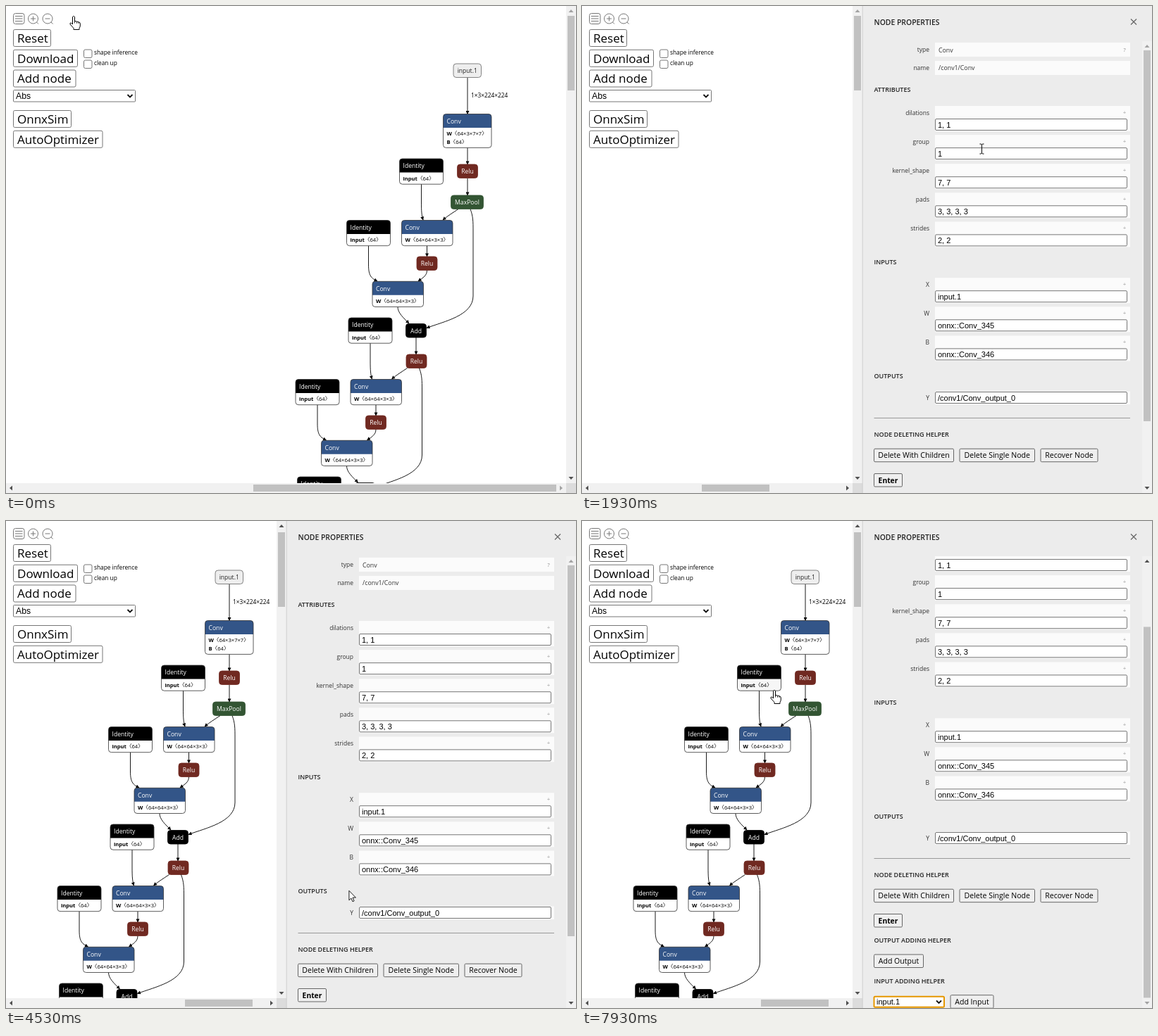
An HTML page for the animation above (8 s loop, 809 by 692 pixels).

```html
<!DOCTYPE html>
<html lang="en">
<head>
<meta charset="utf-8">
<title>Model editor</title>
<style>
html, body { margin: 0; width: 100%; height: 100%; overflow: hidden; background: #fff; }
svg { display: block; width: 100%; height: 100%; font-family: "Open Sans", "Noto Sans CJK SC", "Noto Sans CJK JP", sans-serif; }
.arial { font-family: "Liberation Sans", Arial, sans-serif; }
.edge { fill: none; stroke: #000; stroke-width: .9; marker-end: url(#tip); }
</style>
</head>
<body>
<svg id="stage" viewBox="0 0 809 692">
  <defs>
    <marker id="tip" viewBox="0 0 10 10" refX="9" refY="5" markerWidth="6" markerHeight="5" markerUnits="userSpaceOnUse" orient="auto"><path d="M0 0 10 5 0 10Z"/></marker>
  </defs>
  <g id="scene"></g>
</svg>
<script>
const LOOP = 8000, TICK = 1000 / 15;
const BLUE = '#335588', RED = '#702921', GREEN = '#335533', BLACK = '#000';

const rect = (x, y, w, h, fill, stroke = 'none', r = 0, sw = 1) =>
  `<rect x="${x}" y="${y}" width="${w}" height="${h}" rx="${r}" fill="${fill}" stroke="${stroke}" stroke-width="${sw}"/>`;
const text = (x, y, s, size, attrs = '') => `<text x="${x}" y="${y}" font-size="${size}" ${attrs}>${s}</text>`;
const line = (d, stroke, sw = 1) => `<path d="${d}" fill="none" stroke="${stroke}" stroke-width="${sw}"/>`;
const edge = d => `<path class="edge" d="${d}"/>`;
const clip = (id, x, y, w, h, body) =>
  `<clipPath id="${id}"><rect x="${x}" y="${y}" width="${w}" height="${h}"/></clipPath><g clip-path="url(#${id})">${body}</g>`;

// Piecewise linear tracks: [time, value, value, ...]
function at(keys, t) {
  let i = keys.findIndex(k => k[0] > t);
  if (i < 0) return keys[keys.length - 1].slice(1);
  if (i === 0) return keys[0].slice(1);
  const a = keys[i - 1], b = keys[i], u = (t - a[0]) / (b[0] - a[0]);
  return a.slice(1).map((v, n) => typeof v === 'number' ? v + (b[n + 1] - v) * u : v);
}

const PAN = [[3066, 0, 0], [3600, 98, 12], [3667, 98, 12], [3866, 143, 12], [4000, 232, 12], [4200, 232, 12], [4333, 338, 12]];
const PANEL_LEFT = [[1600, 809], [1666, 640], [1733, 490], [1800, 415], [1866, 398]];
const PANEL_SCROLL = [[4740, 0], [4933, 52], [5066, 106]];
const POINTER = [
  [0, 96, 14, 'hand'], [20, 96, 14, 'arrow'], [200, 150, 40, 'arrow'], [600, 540, 170, 'arrow'],
  [850, 658, 204, 'hand'], [900, 658, 204, 'hand'], [1000, 692, 192, 'hand'], [1130, 632, 174, 'hand'],
  [1266, 658, 186, 'hand'], [1590, 658, 186, 'arrow'], [1680, 658, 186, 'arrow'], [1850, 600, 196, 'beam'],
  [1933, 567.5, 203, 'beam'], [2066, 543.5, 226.5, 'beam'], [2210, 543.5, 226.5, 'arrow'], [2600, 321, 287, 'arrow'],
  [2740, 321, 287, 'arrow'], [3060, 265, 431, 'grab'], [3600, 167, 419, 'grab'], [3667, 167, 419, 'grab'],
  [3866, 122, 419, 'grab'], [4000, 33, 425, 'arrow'], [4200, 250, 430, 'grab'], [4333, 144, 430, 'arrow'],
  [4466, 404, 464, 'arrow'], [4600, 568, 585, 'arrow'], [5540, 568, 585, 'arrow'], [5733, 503, 681, 'arrow'],
  [5866, 503, 681, 'arrow'], [6000, 508, 679, 'arrow'], [6740, 508, 679, 'arrow'], [6933, 518, 668, 'arrow'],
  [7070, 518, 668, 'arrow'], [7400, 523, 647, 'arrow'], [7600, 523, 647, 'arrow'], [7930, 273, 240, 'hand']
];

/* ---- graph ---- */
function card(x, y, w, title, rows, fill, hot) {
  const h = 24.5 + rows.length * 11.7;
  return rect(x, y, w, h, hot ? '#f6f6f6' : '#fff', 'none', 4) +
    `<path d="M${x} ${y + 19.5}v-15.500q0-4 4-4h${w - 8}q4 0 4 4v15.500z" fill="${fill}"/>` +
    rect(x, y, w, h, 'none', '#333', 4, .8) +
    text(x + 5, y + 13.3, title, 8.6, 'fill="#fff"') +
    rows.map(([k, v], i) => text(x + 5, y + 30.6 + i * 11.7, `<tspan font-weight="700">${k}</tspan>〈${v}〉`, 7.6)).join('');
}
const pill = (x, y, w, s, fill, ink = '#fff', stroke = fill) =>
  rect(x, y, w, 19.5, fill, stroke, 4, .8) + text(x + w / 2, y + 13.2, s, 8.6, `text-anchor="middle" fill="${ink}"`);
const identity = (x, y, hot) => card(x, y, 62, 'Identity', [['input', '64']], BLACK, hot);
const conv = (x, y) => card(x, y, 72.5, 'Conv', [['W', '64×64×3×3']], BLUE);

const block = (i, hot) => `<g transform="translate(${-72.5 * i} ${226 * i})">` +
  edge('M589.500 253V278C589.500 292 590 298 592 304') +
  edge('M642 288.500C634 294 627 298 620 304') +
  edge('M659 288.500C663 299 663 306 663 320V412C663 440 622 448 597 457.500') +
  edge('M514.500 340.500V368C514.500 384 519 387 527 391') +
  edge('M597.500 340.500V356') +
  edge('M597.500 375.500C597.500 383 592 386 585 391') +
  edge('M556 427.500C556 436 564 443 572 451') +
  edge('M582 471V495') +
  identity(558.5, 217, hot) + conv(561.5, 304.5) + identity(483.5, 304.5) +
  pill(583, 356, 29, 'Relu', RED) + conv(520, 391.3) +
  pill(567.5, 451.5, 29, 'Add', BLACK) + pill(568, 495, 29, 'Relu', RED) + '</g>';

function graph(t) {
  return edge('M655 102V153.500') + edge('M655 201V225') + edge('M655 245V269') +
    pill(635, 82, 39.5, 'input.1', '#eee', '#222', '#666') +
    text(660, 130, '1×3×224×224', 8.3) +
    card(620.5, 153.5, 68.5, 'Conv', [['W', '64×3×7×7'], ['B', '64']], BLUE, t > 1200 && t < 1600) +
    pill(640.5, 225, 29, 'Relu', RED) +
    block(0, t > 7900) + block(1) + block(2) +
    pill(631.5, 269, 46, 'MaxPool', GREEN);
}

/* ---- scrollbars ---- */
const tri = (x, y, turn, on) =>
  `<path d="M-3.500 2H3.500L0-2Z" transform="translate(${x} ${y}) rotate(${turn})" fill="${on ? '#505050' : '#a3a3a3'}"/>`;
const vbar = (x, y, h, top, len, up, down) => rect(x, y, 14, h, '#f1f1f1') + rect(x + 2, top, 10, len, '#c1c1c1') +
  tri(x + 7, y + 7, 0, up) + tri(x + 7, y + h - 7, 180, down);
const hbar = (x, y, w, left, len, lo, hi) => rect(x, y, w, 14, '#f1f1f1') + rect(left, y + 2, len, 10, '#c1c1c1') +
  tri(x + 7, y + 7, -90, lo) + tri(x + w - 7, y + 7, 90, hi);

/* ---- toolbar ---- */
const bigButton = (y, w, s) => rect(10.5, y, w, 24, '#fff', '#767676', 2) + text(16, y + 18.2, s, 17);
const chevron = (x, y) => line(`M${x - 3.5} ${y - 2}l3.500 3.500 3.500-3.500`, '#111', 1.8);
const lens = (x, mark) => `<circle cx="${x}" cy="18" r="7" fill="none" stroke="#777"/>` + line(mark + `M${x + 5} 23l2.500 2.500`, '#777');
const check = (y, s) => rect(110.5, y, 11.5, 11.5, '#fff', '#767676', 2) + text(125, y + 7.3, s, 8.3);
const toolbar =
  rect(10.5, 10.5, 15.5, 15, 'none', '#777', 3) + line('M13 14.500H23.500M13 18H23.500M13 21.500H23.500', '#777') +
  lens(38.5, 'M35 18h7M38.500 14.500v7') + lens(59, 'M55.500 18h7') +
  bigButton(33.5, 53, 'Reset') + bigButton(62.3, 91, 'Download') + bigButton(91, 88.5, 'Add node') +
  check(62, 'shape inference') + check(77, 'clean up') +
  rect(10.5, 119.5, 173, 16.5, '#fff', '#767676', 1) + text(14, 132.3, 'Abs', 12.2, 'class="arial"') + chevron(176, 128) +
  bigButton(148.5, 82, 'OnnxSim') + bigButton(177.3, 126.5, 'AutoOptimizer');

function mainView(t) {
  const [px, py] = at(PAN, t), open = t >= 1595, w = open ? 384 : 795;
  return clip('view', 0, 0, w, 678, `<g transform="translate(${-px} ${-py})">${graph(t)}</g>`) + toolbar +
    vbar(w, 0, 678, 14 + py / 6, 106, py > 0, true) +
    (open ? hbar(0, 678, w, 170 + px * .2485, 96, true, true) : hbar(0, 678, w, 351, 430, true, false)) +
    rect(w, 678, 14, 14, '#dcdcdc');
}

/* ---- properties panel ---- */
function panel(t) {
  const [left] = at(PANEL_LEFT, t), [scroll] = at(PANEL_SCROLL, t);
  const x = left + 16.5, vx = left + 103, vw = Math.max(0, 778 - vx), tight = left > 600;
  let shift = 0, values = '', body = '';

  const heading = (y, s) => body += text(x, y + shift + 3.3, s, 9, 'font-weight="600" fill="#222"');
  const label = (y, s) => body += text(left + 95, y + shift + 3, s, 8.5, 'text-anchor="end" fill="#333"');
  const button = (dx, y, w, s, attrs) => body += rect(x + dx, y + shift, w, 18.5, '#efefef', '#666', 1.5) +
    text(x + dx + w / 2, y + shift + 13.2, s, attrs ? 10.3 : 10.55, 'text-anchor="middle" ' + (attrs || ''));
  const grow = bottom => {
    if (tight) values += hbar(vx, bottom + shift, vw, vx + 15, 6, false, true);
    shift += tight ? 14 : 0;
  };
  const field = (y, s) => values += rect(vx + .5, y + shift, tight ? 160 : Math.max(0, vw - 5), 16, '#fff', '#767676', 1.5) +
    text(vx + 4, y + shift + 12, s, 11, 'class="arial"');
  const row = (y, name, s) => {
    label(y, name);
    values += rect(vx, y - 9.5 + shift, vw, 36, '#fbfbfb') + text(770, y + shift + 2.5, '+', 8, 'text-anchor="middle" fill="#999"');
    field(y + 9, s);
    grow(y + 26);
  };

  label(62, 'type');
  values += rect(vx, 52, vw, tight ? 34 : 20, '#fbfbfb') + text(770, 64.5, '?', 7.5, 'text-anchor="middle" fill="#888"') +
    text(vx + 5, tight ? 79.5 : 65.5, 'Conv', 8.8, 'fill="#333"');
  shift = tight ? 14 : 0;
  label(87.5, 'name');
  values += rect(vx, 78 + shift, vw, 20, '#fbfbfb') + text(vx + 5, 91 + shift, '/conv1/Conv', 8.8, 'fill="#333"');
  grow(97);
  heading(119, 'ATTRIBUTES');
  [['dilations', '1, 1'], ['group', '1'], ['kernel_shape', '7, 7'], ['pads', '3, 3, 3, 3'], ['strides', '2, 2']]
    .forEach(([k, v], i) => row(151.5 + i * 41.1, k, v));
  heading(363.5, 'INPUTS');
  [['X', 'input.1'], ['W', 'onnx::Conv_345'], ['B', 'onnx::Conv_346']].forEach(([k, v], i) => row(395.7 + i * 41.1, k, v));
  heading(525.5, 'OUTPUTS');
  label(556.5, 'Y');
  values += rect(vx, 547.5 + shift, vw, 18.5, '#fbfbfb');
  field(548.5, '/conv1/Conv_output_0');
  grow(566);
  body += line(`M${x} ${585.5 + shift}H778`, '#999');
  heading(608.5, 'NODE DELETING HELPER');
  button(0, 629.2, 113, 'Delete With Children');
  button(121.5, 629.2, 106.5, 'Delete Single Node');
  button(236.5, 629.2, 81, 'Recover Node');
  button(0, 664.5, 40, 'Enter', 'font-weight="700"');
  heading(701.7, 'OUTPUT ADDING HELPER');
  button(0, 722, 70, 'Add Output');
  heading(759.3, 'INPUT ADDING HELPER');
  const focus = t > 6450;
  body += rect(x, 781.7 + shift, 99.5, 15, '#fff', focus ? '#e59700' : t > 5700 ? '#4f4f4f' : '#767676', 1.5, focus ? 2 : 1) +
    text(x + 3.5, 793.3 + shift, 'input.1', 11, 'class="arial"') + chevron(x + 92, 789.5 + shift);
  button(108.5, 779.7, 61, 'Add Input');

  const bar = tight ? 414 : 527;
  return rect(398, 0, 411, 692, '#fff') + clip('panel', left - .5, 0, Math.max(0, 809.5 - left), 692,
    rect(left, 0, 411, 692, '#ececec') + line(`M${left} 0V692`, '#c4c4c4') +
    text(x, 27, 'NODE PROPERTIES', 10.4, 'font-weight="600" fill="#222"') +
    line('M779 18.500l8 8M787 18.500l-8 8', '#666', 1.2) +
    clip('body', 0, 50, 795, 642, `<g transform="translate(0 ${-scroll})">${body}${clip('values', vx, 0, vw, 900, values)}</g>`) +
    vbar(795, 50, 642, 63 + scroll * .825, bar, scroll > 0, scroll < 105));
}

/* ---- pointer ---- */
const SHAPES = {
  arrow: '<path d="M.5.500V14L3.500 11.200 5.600 16 7.700 15 5.600 10.300H10Z" fill="#fff" stroke="#000" stroke-width=".9"/>',
  hand: '<path d="M0 .500C1 .500 1.500 1 1.500 2V8Q3 7 4.500 8.300Q6 7.500 7 9Q9 8.500 9.300 11V14Q9.200 16 8 17.500V19.500H0V17.500L-5 12Q-5.500 9.500-3.500 10L-1.500 12V2C-1.500 1-1 .500 0 .500Z" fill="#fff" stroke="#000"/><path d="M1.500 8v2.500M4.500 8.300v2.500M7 9v2" stroke="#000" stroke-width=".8"/>',
  beam: line('M-3-7H-1L0-6 1-7H3M0-6V6M-3 7H-1L0 6 1 7H3', '#000'),
  grab: '<path d="M-4-3.500Q-3-6-1.500-4.800Q0-6.500 1.500-4.800Q3-5.800 4-4Q5.700-3.500 5.500-1V1Q5 4 3 5.500H-2.500Q-5 3-5.500 0Q-5.500-1.800-4-1.500Z" fill="#fff" stroke="#000"/>'
};
function pointer(t) {
  const [x, y, kind] = at(POINTER, t);
  return `<g transform="translate(${x} ${y})">${SHAPES[kind]}</g>`;
}

const scene = document.getElementById('scene');
let last = -1;
function draw(now) {
  const n = Math.floor((now % LOOP + 4) / TICK);
  if (n !== last) {
    const t = n * TICK;
    scene.innerHTML = mainView(t) + (t >= 1595 ? panel(t) : '') + pointer(t);
    last = n;
  }
  requestAnimationFrame(draw);
}
draw(0);
</script>
</body>
</html>
```
